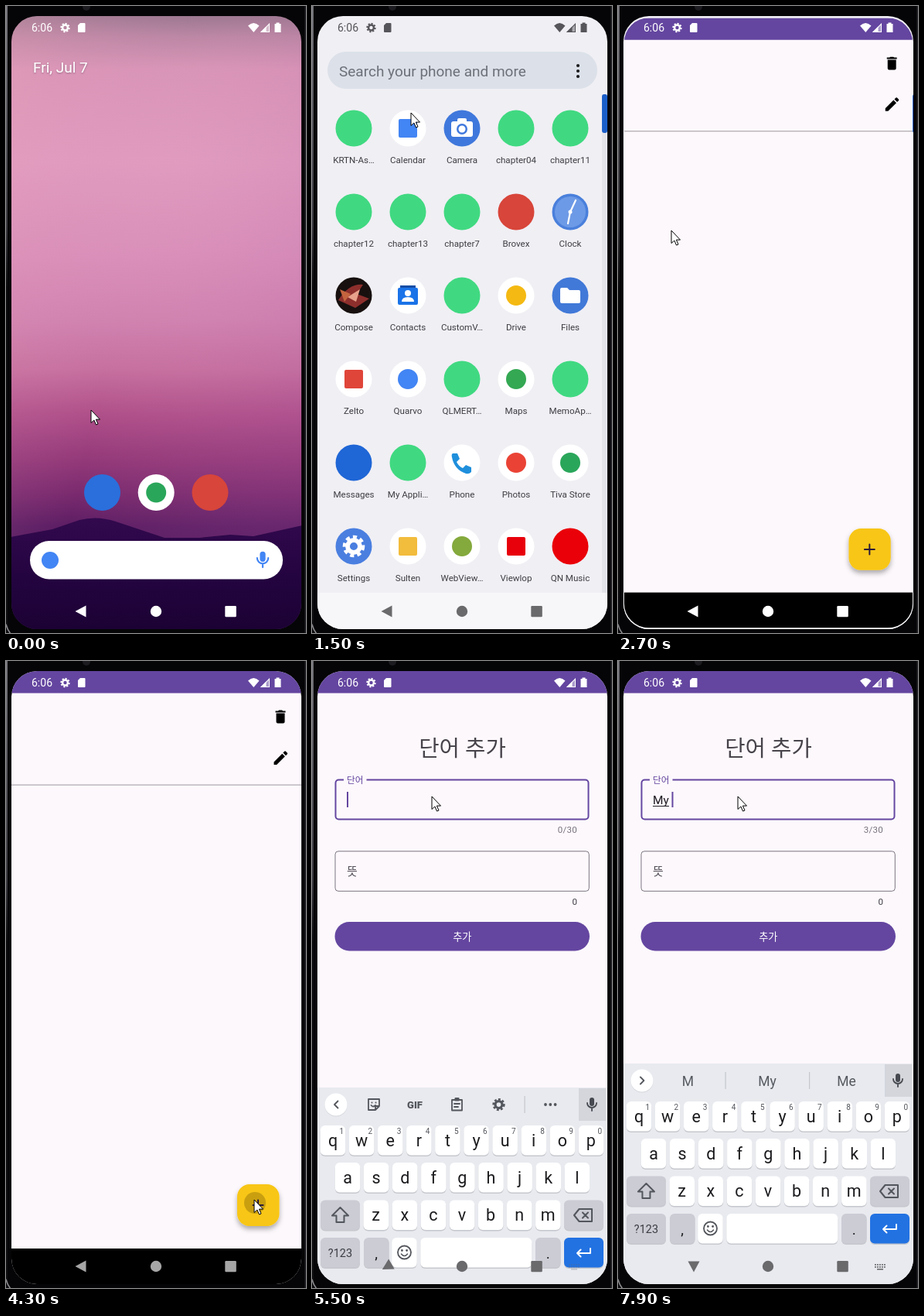
These frames come from a looping animation (388 by 810 pixels, 8 s). An HTML page:

```html
<!DOCTYPE html>
<html lang="en">
<head>
<meta charset="utf-8">
<title>Phone demo</title>
<style>
  html, body { margin: 0; width: 100%; height: 100%; overflow: hidden; background: #050507; }
  svg { display: block; width: 388px; height: 810px; }
  text { font-family: Roboto, "Noto Sans CJK KR", "Noto Sans CJK JP", sans-serif; white-space: pre; }
</style>
</head>
<body>
<svg id="stage" viewBox="0 0 388 810" xmlns="http://www.w3.org/2000/svg"></svg>
<script>
const LOOP = 8000, STEP = 100;
const PURPLE = "#6446a0", PAPER = "#fdf8fc", BLUE = "#3f78dc";

// Markup helpers
const rect = (x, y, w, h, fill, r = 0, more = "") =>
  `<rect x="${x}" y="${y}" width="${w}" height="${h}" rx="${r}" fill="${fill}" ${more}/>`;
const disc = (x, y, r, fill, more = "") =>
  `<circle cx="${x}" cy="${y}" r="${r}" fill="${fill}" ${more}/>`;
const path = (d, fill, more = "") => `<path d="${d}" fill="${fill}" ${more}/>`;
const line = (d, color, w = 1.8) =>
  path(d, "none", `stroke="${color}" stroke-width="${w}" stroke-linecap="round" stroke-linejoin="round"`);
const text = (x, y, size, str, fill, anchor = "start", more = "") =>
  `<text x="${x}" y="${y}" font-size="${size}" fill="${fill}" text-anchor="${anchor}" ${more}>${str}</text>`;
const group = (id, body, more = "") => `<g id="${id}" ${more}>${body}</g>`;
const place = (x, y, body, s = 1) => `<g transform="translate(${x} ${y}) scale(${s})">${body}</g>`;

// Glyphs, centred on 0,0
const gear = c => `<g fill="none" stroke="${c}">
  <circle r="3.6" stroke-width="2.6"/>
  <circle r="5.5" stroke-width="2" pathLength="16" stroke-dasharray="1.1 .9"/></g>`;
const mic = c => rect(-3, -9, 6, 11, c, 3) + line("M-6-2A6 6 0 0 0 6-2M0 4V8", c);
const square = c => rect(-12, -12, 24, 24, c, 2);
const dot = c => disc(0, 0, 13, c);
const camera = rect(-14, -9, 28, 20, "#fff", 3) + rect(-6, -13, 12, 6, "#fff", 2) +
  disc(0, 1, 7, BLUE) + disc(0, 1, 4.5, "#fff");
const clock = disc(0, 0, 20, "#6d9ae6") + line("M0 0L7-15M0 0L-3 15", "#fff", 2.2) + disc(0, 0, 2.5, "#fff");
const folder = path("M-13-8q0-2 2-2h7l3 3h12q2 0 2 2v13q0 2-2 2h-22q-2 0-2-2z", "#fff");
const people = rect(-13, -10, 26, 22, "#1a73e8", 2) + rect(-10, -13, 20, 3, "#174ea6") +
  disc(0, -3, 4, "#fff") + path("M-8 8q0-6 8-6t8 6z", "#fff");
const handset = path("M-12-12h6l3 7-4 4q3 6 8 8l4-4 7 3v6q-3 3-7 2Q-10 9-13-7q-1-4 1-5z", "#1f8fdc");
const picture = path("M-20 6Q-6-16 12-14L4-2 20 4 2 16z", "#8d2f2c") +
  path("M-8 2L8-8 3 8z", "#e8a28c") + path("M-18-8L-4-2-12 8z", "#c4643f");

const GREEN = ["#40d981"], WHITE = "#fff";
const APPS = [
  ["KRTN-As…", ...GREEN], ["Calendar", WHITE, square("#4285f4")], ["Camera", BLUE, camera],
  ["chapter04", ...GREEN], ["chapter11", ...GREEN],
  ["chapter12", ...GREEN], ["chapter13", ...GREEN], ["chapter7", ...GREEN],
  ["Brovex", "#d8453a"], ["Clock", "#4a80dc", clock],
  ["Compose", "#17100f", picture], ["Contacts", WHITE, people], ["CustomV…", ...GREEN],
  ["Drive", WHITE, dot("#f4b912")], ["Files", "#4179d8", folder],
  ["Zelto", WHITE, square("#e0453a")], ["Quarvo", WHITE, dot("#4285f4")], ["QLMERT…", ...GREEN],
  ["Maps", WHITE, dot("#34a853")], ["MemoAp…", ...GREEN],
  ["Messages", "#1f66d6"], ["My Appli…", ...GREEN], ["Phone", WHITE, handset],
  ["Photos", WHITE, dot("#ea4335")], ["Tiva Store", WHITE, dot("#2aa65a")],
  ["Settings", "#4a7fe0", place(0, 0, gear("#fff"), 2.2)], ["Sulten", WHITE, square("#f2bc3c")],
  ["WebView…", WHITE, dot("#84a93c")], ["Viewlop", WHITE, square("#e8000b")], ["QN Music", "#ea0008"]
];

const icon = (x, y, fill, inner = "") => place(x, y, disc(0, 0, 23.5, fill) + inner);

function wallpaper() {
  return rect(0, 0, 388, 810, "url(#sky)") + rect(0, 0, 388, 810, "url(#haze)") +
    path("M0 687L60 676 95 664Q118 658 142 666L205 687 250 687 290 683 320 685 388 670V810H0z", "url(#hill)");
}

const hotseat = icon(124.5, 628.5, "#2a6fdc") + icon(194.2, 628.5, "#fff", dot("#2aa65a")) +
  icon(264, 628.5, "#d8453a") + rect(31, 691, 327, 49.5, "#fff", 24.7) +
  disc(57, 716, 11, "#4285f4") + place(332, 715.5, mic("#4285f4"), 1.2);

function drawer() {
  const cells = APPS.map(([name, fill, inner], i) => {
    const x = 54 + 70 * (i % 5), y = 158 + 108 * Math.floor(i / 5);
    return icon(x, y, fill, inner) + text(x, y + 45, 11.6, name, "#3c3d42", "middle");
  }).join("");
  const dots = [77, 84, 91].map(y => disc(344, y, 2.1, "#1b1b1e")).join("");
  return group("drawerBg", rect(0, 0, 388, 810, "#f0eff4") + rect(0, 758, 388, 52, "#f7f6f9")) +
    group("drawerBody", rect(20, 59, 349, 48, "#dce1e9", 24) +
      text(35, 91, 19, "Search your phone and more", "#6c7078") + dots +
      rect(375, 114, 7, 644, "#e3e4e9") + rect(375, 114, 7, 50, "#1b5fc9", 3) + cells);
}

function listScreen() {
  const trash = path("M-5.5-4.5h11v11q0 2-2 2h-7q-2 0-2-2zM-6.5-7.5h3.5l1-1h4l1 1h3.5v2h-13z", "#000");
  const pencil = path("M-8.5 8.5v-3.6L2.2-5.8 5.8-2.2-4.9 8.5zM3.3-6.9L5.2-8.8q.8-.7 1.6 0L8.8-6.8q.7.8 0 1.6L6.9-3.3z", "#000");
  return rect(7, 13, 375, 792, PAPER) + rect(7, 13, 375, 28.5, PURPLE) +
    place(355, 72, trash) + place(355, 125.5, pencil) + rect(7, 159.5, 375, 1.2, "#aaa7ad") +
    rect(299, 676, 54.5, 54, "#f8c612", 16, 'filter="url(#lift)"') +
    disc(322, 700, 14, "#3a2a00", 'id="ripple" opacity=".25"') +
    line("M319.5 703H332.5M326 696.5V709.5", "#2c1b38", 2) + rect(7, 759, 375, 46, "#000");
}

function formScreen() {
  const label = PURPLE;
  return rect(0, 13, 388, 797, PAPER) + rect(0, 13, 388, 28.5, PURPLE) +
    text(194.5, 123, 28.7, "단어 추가", "#47434a", "middle") +
    group("idleField", rect(30, 153.5, 328, 51, "none", 4, 'stroke="#7b7680"') +
      text(45, 184, 15, "단어", "#55515a")) +
    group("focusField", rect(30.5, 153.5, 327, 51, "none", 4, `stroke="${PURPLE}" stroke-width="2"`) +
      rect(41, 150, 29.5, 6, PAPER) + text(45, 157.5, 11.6, "단어", label) +
      text(45, 185, 15.5, "", "#1f1b22", "start", 'id="typed"') +
      rect(45, 187, 21, 1, "#1f1b22", 0, 'id="under"') + rect(45, 169, 2, 20, PURPLE, 0, 'id="caret"')) +
    text(343, 221.5, 11.5, "0/30", "#77727c", "end", 'id="count" letter-spacing=".3"') +
    rect(30, 245.8, 328.3, 51.5, "none", 4, 'stroke="#7b7680"') +
    text(45, 276.5, 15, "뜻", "#55515a") + text(343, 314.5, 11.5, "0", "#3f3b44", "end") +
    rect(29.5, 337, 329.5, 37.5, PURPLE, 18.7) + text(194.3, 360.5, 13.2, "추가", "#fff", "middle");
}

function keyboard() {
  const ink = "#1b1b1e", grey = "#cbccd4", dim = "#53565c";
  const key = (x, y, w, fill = "#fff") => rect(x, y + 1, w, 39, "#c6c8ce", 6) + rect(x, y, w, 38.5, fill, 6);
  const row = (chars, x0, y) => [...chars].map((c, i) => {
    const x = x0 + 37.1 * i;
    return key(x - 16.2, y, 32.5) + text(x, y + 26.5, 21.5, c, ink, "middle");
  }).join("");
  const digits = [..."1234567890"].map((c, i) =>
    text(38.3 + 37.1 * i, 579.5, 10, c, dim, "middle")).join("");
  const keys = row("qwertyuiop", 27, 569) + digits + row("asdfghjkl", 46, 617) + row("zxcvbnm", 82.7, 665.5) +
    key(11, 665.5, 51, grey) + key(326, 665.5, 51, grey) +
    line("M36.500 675L47 685.500H41.500V694H31.500V685.500H26z", dim, 2) +
    line("M339 685L345.500 677H362V693H345.500zM350 681.500L357 688.500M357 681.500L350 688.500", dim, 2) +
    key(11, 714, 51, grey) + text(36.5, 739, 14.5, "?123", "#3b3d43", "middle") +
    key(67, 714, 32.5, grey) + text(83, 741, 19, ",", ink, "middle") + key(103.2, 714, 32.5) +
    disc(119.5, 733, 8.5, "none", `stroke="${dim}" stroke-width="1.8"`) +
    disc(116.4, 730.5, 1.4, dim) + disc(122.6, 730.5, 1.4, dim) + line("M115.500 735Q119.500 740 123.500 735", dim, 1.6) +
    key(140.3, 714, 144) + key(289, 714, 32.5, grey) + text(305.2, 741, 19, ".", ink, "middle") +
    key(326, 714, 51, "#2272e2") + line("M360 728V734H343M347.500 729.500L343 734 347.500 738.500", "#fff", 2);
  const sticker = line("M73 535H87V544L82 549H73zM87 544H82V549M76.500 543Q79 546 82 543", dim) +
    disc(77.5, 539.5, 1, dim) + disc(82.5, 539.5, 1, dim);
  const clip = line("M181 536H194V549.500H181zM184 541H191M184 545H189", dim) + rect(184.5, 533, 6, 4.5, dim, 1);
  const more = [302, 308.3, 314.6].map(x => disc(x, 542, 1.9, dim)).join("");
  const rule = x => rect(x, 531, 1.2, 22, "#c3c6cc");
  const tools = line("M33.500 537.500L29 542 33.500 546.500", dim, 1.8) + sticker +
    text(133, 546.5, 13, "GIF", dim, "middle", 'font-weight="900"') + clip +
    place(241.5, 542, gear(dim), 1.25) + rule(274.5) + more;
  const words = line("M29 537.500L33.500 542 29 546.500", dim, 1.8) + rule(138.500) + rule(247) +
    ["M", "My", "Me"].map((w, i) => text(90.5 + 102.5 * i, 548.5, 17.5, w, "#54585e", "middle")).join("");
  return rect(0, 520, 388, 300, "#e8eaef") + disc(31, 543, 14.5, "#d4d6db") + disc(31, 542, 14.5, "#fff") +
    rect(345, 521, 35, 42, "#d4d6dc") + place(362, 542, mic("#46494f"), 1) +
    group("tools", tools) + group("words", words) + keys;
}

function statusBar() {
  const c = "currentColor";
  return text(33, 33, 14, "6:06", c) + place(76.5, 28, gear(c), .95) +
    path("M96 22H101.500Q102.500 22 102.500 23V33Q102.500 34 101.500 34H94Q93 34 93 33V25z", c) +
    path("M313 25.500Q320.300 18.500 327.500 25.500L320.300 34z", c) +
    path("M341 22V34H329z", c, 'opacity=".45"') + path("M336.500 26.500V34H329z", c) +
    path("M341 22V34H329zM340 24.500L331.500 33H340z", c, 'fill-rule="evenodd"') +
    path("M349.500 21.500H353.500V23H355.500V34H347.500V23H349.500z", c);
}

const keyRows = [779, 782].map(y =>
  [0, 1, 2, 3, 4].map(i => rect(332 + 3 * i, y, 1.8, 1.8, "currentColor")).join("")).join("");
const navBar = path("M89.500 782L103.500 774.500V789.500z", "currentColor", 'id="back"') +
  disc(194, 782, 7.2, "currentColor") + rect(283.3, 775, 14.5, 14.3, "currentColor", 1.2) +
  group("dock", keyRows + rect(335, 785, 8, 1.6, "currentColor"));

const stops = list => list.map(([o, c, a = 1]) =>
  `<stop offset="${o}" stop-color="${c}" stop-opacity="${a}"/>`).join("");
const down = (id, list, more = 'x2="0" y2="1"') => `<linearGradient id="${id}" ${more}>${stops(list)}</linearGradient>`;

const stage = document.getElementById("stage");
stage.innerHTML = `<defs>
  ${down("sky", [[.015, "#9c7890"], [.05, "#bd88a5"], [.1, "#d995b7"], [.25, "#e09bbf"], [.4, "#d98fb9"], [.5, "#d183b0"],
    [.58, "#c6709f"], [.65, "#b0508a"], [.72, "#953a7a"], [.78, "#792a6e"], [.83, "#5c1d63"], [1, "#3b0f52"]])}
  ${down("haze", [[0, "#f0a8b8", .25], [.5, "#d88ab8", 0], [1, "#b060a8", .15]], 'x2="1" y2=".5"')}
  ${down("hill", [[0, "#32094e"], [.5, "#240440"], [1, "#1b0233"]])}
  ${down("edge", [[0, "#77777d"], [.35, "#3c3c42"], [.45, "#0c0c0e"], [1, "#101013"]])}
  <clipPath id="glass"><rect x="7" y="13" width="375" height="792" rx="33"/></clipPath>
  <clipPath id="pane"><rect x="7" y="13" width="375" height="792" rx="32"/></clipPath>
  <filter id="lift" x="-30%" y="-30%" width="160%" height="170%">
    <feDropShadow dx="0" dy="4" stdDeviation="3" flood-color="#000" flood-opacity=".32"/></filter>
  <filter id="soft"><feDropShadow dx="0" dy="1" stdDeviation="1" flood-color="#503048" flood-opacity=".5"/></filter>
</defs>` +
  rect(0, 0, 388, 810, "#050507") + rect(0, 0, 2, 810, "url(#edge)") + rect(386.5, 0, 1.5, 810, "#29292d") +
  disc(104, 1, 5, "#1b1b20") + line("M0 799Q2 806 6 811", "#8a8a8e", 1.6) +
  `<g clip-path="url(#glass)">` +
  group("home", wallpaper() + group("date", text(35, 86, 19, "Fri, Jul 7", "#fff"), 'filter="url(#soft)"') + group("hotseat", hotseat)) +
  group("drawer", drawer()) +
  group("list", listScreen(), 'clip-path="url(#pane)"') +
  group("form", formScreen()) + group("keys", keyboard()) +
  group("status", statusBar()) + group("nav", navBar) + `</g>` +
  group("pointer", path("M0 0V16.500L3.900 13 6.500 19 9 18 6.400 12.100H11.500z", "#fff", 'stroke="#000" stroke-linejoin="round"'));

const el = {};
stage.querySelectorAll("[id]").forEach(n => el[n.id] = n);

// Tracks: [time, values...], linear between rows
const TRACKS = {
  pointer: [[0, 110, 522], [1000, 136, 506], [1100, 136, 500], [1200, 135, 400], [1300, 131, 240], [1400, 128, 150],
    [1500, 128, 138], [1700, 128, 138], [2200, 69, 290], [3300, 69, 290], [4100, 321, 696], [4400, 321, 696], [5100, 155, 175]],
  home: [[1000, 0, 1], [1100, -5, .88], [1200, -60, .45], [1300, -120, 0]],
  drawer: [[1100, 600, 0], [1200, 420, .25], [1300, 150, .75], [1400, 20, 1], [1500, 0, 1]],
  launch: [[2300, 54, 266, .12], [2400, 110, 330, .5], [2500, 165, 385, .82], [2600, 190, 406, .95],
    [2700, 194.5, 409.4, .995], [2800, 194.5, 409, 1]],
  form: [[4300, 48, 0], [4400, 20, .6], [4500, 0, 1]],
  keys: [[5200, 290], [5300, 170], [5400, 80], [5500, 31], [5600, 8], [5700, 0]],
  back: [[5300, 0, 0], [5500, -30, .3], [5600, -65, .7], [5700, -90, 1]]
};
const TYPING = [[0, ""], [6800, "M"], [7200, "My"], [7500, "My "]];
const STATUS = [[0, "#fff"], [1300, "#56565a"], [2500, "#fff"]];
const NAV = [[0, "#fff"], [1300, "#6a6a6d"], [2500, "#fff"], [4300, "#a6a6a6"], [4400, "#6a6a6d"]];
const CARET = { "": 45, "M": 59, "My": 66.5, "My ": 69.5 };

function at(name, t) {
  const rows = TRACKS[name], i = rows.findIndex(r => r[0] > t);
  if (i === 0) return rows[0].slice(1);
  if (i < 0) return rows[rows.length - 1].slice(1);
  const a = rows[i - 1], b = rows[i], k = (t - a[0]) / (b[0] - a[0]);
  return a.slice(1).map((v, n) => v + (b[n + 1] - v) * k);
}
const last = (rows, t) => rows.filter(r => r[0] <= t).pop();
const show = (node, on) => node.setAttribute("display", on ? "inline" : "none");
const move = (node, x, y, more = "") => node.setAttribute("transform", `translate(${x} ${y}) ${more}`);
const fade = (node, v) => node.setAttribute("opacity", v);

function draw(t) {
  move(el.pointer, ...at("pointer", t));

  const [lift, seat] = at("home", t);
  show(el.home, t < 1500);
  move(el.date, 0, lift);
  move(el.hotseat, 0, lift);
  fade(el.hotseat, seat);
  fade(el.date, t < 1200 ? 1 : seat);

  const [slide, veil] = at("drawer", t);
  show(el.drawer, t > 1100 && t < 2800);
  fade(el.drawer, veil);
  move(el.drawerBody, 0, slide);

  const [cx, cy, s] = at("launch", t);
  show(el.list, t > 2300 && t < 4500);
  move(el.list, cx, cy, `scale(${s}) translate(-194.5 -409)`);
  show(el.ripple, t >= 4200);

  const [shift, alpha] = at("form", t);
  show(el.form, t > 4300);
  move(el.form, shift, 0);
  fade(el.form, alpha);

  const focus = t >= 5200, [since, word] = last(TYPING, t);
  show(el.idleField, !focus);
  show(el.focusField, focus);
  el.typed.textContent = word.trim();
  el.count.textContent = word.length + "/30";
  show(el.under, word);
  el.under.setAttribute("width", word.length > 1 ? 21 : 13.5);
  el.caret.setAttribute("x", CARET[word]);
  show(el.caret, (t - Math.max(since, 5200)) % 1000 < 500);

  show(el.keys, t > 5200);
  move(el.keys, 0, at("keys", t)[0]);
  show(el.tools, !word);
  show(el.words, word);

  const [turn, dock] = at("back", t);
  el.back.setAttribute("transform", `rotate(${turn} 97.5 781.500)`);
  fade(el.dock, dock);
  el.status.setAttribute("color", last(STATUS, t)[1]);
  el.nav.setAttribute("color", last(NAV, t)[1]);
}

const start = performance.now();
function tick() {
  const t = (performance.now() - start) % LOOP;
  draw(Math.floor(t / STEP) * STEP);
  requestAnimationFrame(tick);
}
tick();
</script>
</body>
</html>
```
